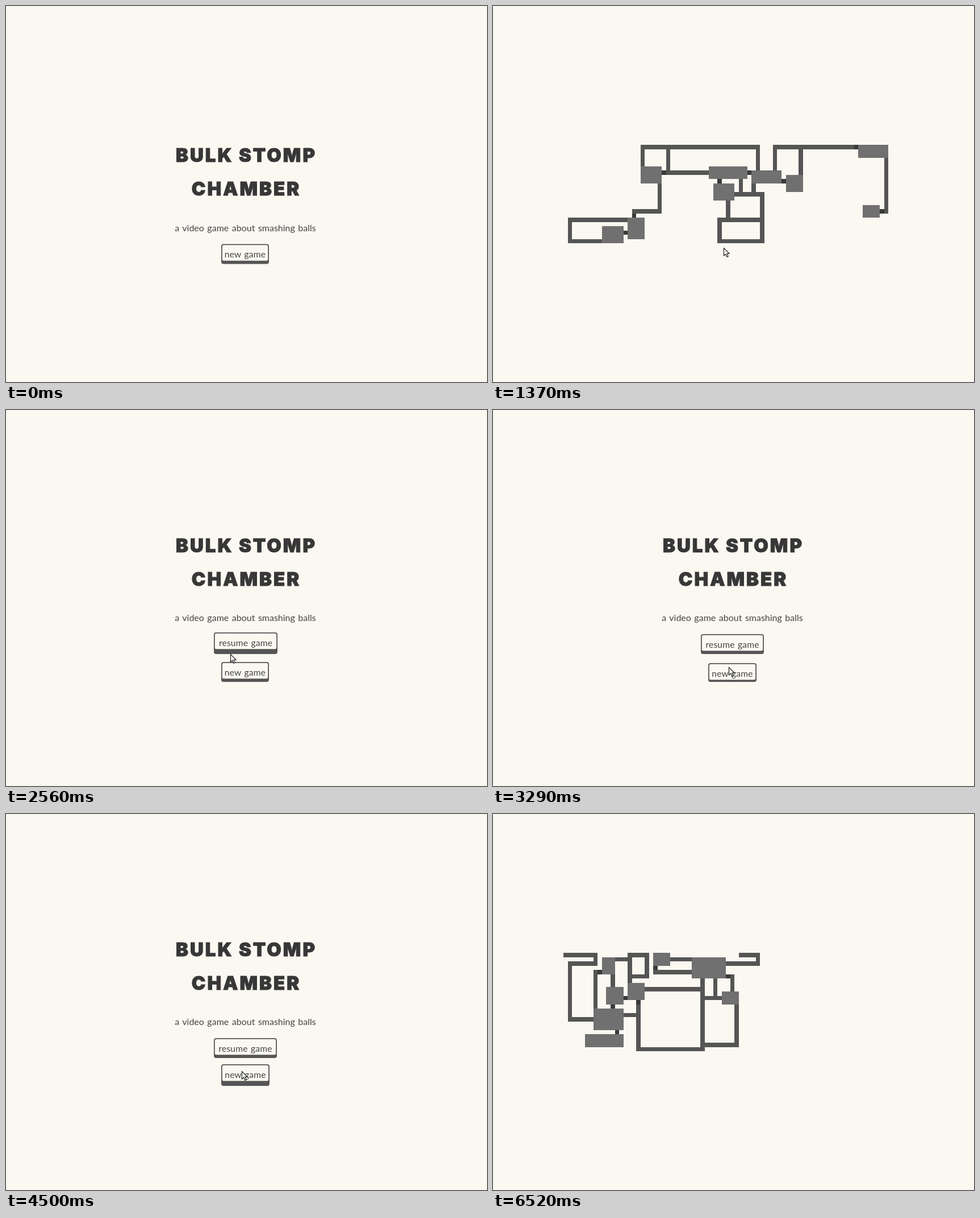
Write an HTML page that moves like this. It is 847 px wide and 661 px high and loops after 9.84 s.

```html
<!DOCTYPE html>
<html lang="en">
<head>
<meta charset="utf-8">
<title>Bulk Stomp Chamber</title>
<style>
  html, body { margin: 0; width: 100%; height: 100%; overflow: hidden; background: #fbf8f1; }
  svg { display: block; width: 100%; height: 100%; }
  text { text-anchor: middle; }
  .title { font: 900 33px Inter, sans-serif; letter-spacing: 3px; fill: #373737; stroke: #373737; stroke-width: 1; }
  .tag { font: 400 16px Lato, sans-serif; word-spacing: 1.4px; fill: #444; }
  .label { font: 400 15.6px Lato, sans-serif; letter-spacing: .2px; word-spacing: 1px; fill: #444; }
  .map { shape-rendering: crispEdges; }
  .hall { fill: none; stroke: #555; stroke-width: 1; stroke-linecap: square; }
  .room { fill: #707070; }
  .door { fill: #3a3a3a; }
</style>
</head>
<body>
<svg id="stage" viewBox="0 0 847 661"></svg>
<script>
const LOOP = 9840, PAPER = '#fbf8f1', INK = '#555';
const stage = document.getElementById('stage');

function add(parent, tag, attrs = {}, text = '') {
  const el = document.createElementNS('http://www.w3.org/2000/svg', tag);
  set(el, attrs);
  el.textContent = text;
  parent.appendChild(el);
  return el;
}
function set(el, attrs) {
  for (const key in attrs) el.setAttribute(key, attrs[key]);
}
const show = (el, on) => set(el, { display: on ? 'inline' : 'none' });

// Dungeon maps in grid cells: halls run through cell centres.
const dungeons = [
  {
    halls: 'M18 5V0H45V6M24 0V6M23 6H34M41 8V11M44 9V11M40 11H46V22H36V17H46M38 13V17' +
           'M49 6V0H69M55 0V7M75 3V15M22 9V15H16M14 17H1V22H9',
    rooms: ['18 5 5 4', '34 5 9 3', '44 6 7 3', '52 7 4 4', '35 9 5 4',
            '69 0 7 3', '70 14 4 3', '15 17 4 5', '9 19 5 4'],
    doors: ['23 6', '43 6', '36 8', '51 8', '68 0', '74 15', '16 16', '14 20']
  },
  {
    halls: 'M14 0H0V21H11M20 5V15M23 3H34V10M24 3V6M27 3V6M30 7H38V10M30 14H33' +
           'M30 17H37M37 15V22M37 18H40V15M25 19H29M18 22H24M13 11H18V6',
    rooms: ['15 0 8 5', '22 7 8 5', '8 10 5 5', '14 14 5 4', '12 19 6 4',
            '21 18 4 3', '27 13 3 5', '34 11 7 4', '32 20 4 3'],
    doors: ['23 3', '19 15', '28 12', '36 22', '29 18', '24 21', '14 18', '13 14']
  },
  {
    halls: 'M0 0H7V2H1V15H6M8 4H7V12M11 5V7M12 1H14M15 6V0H19V5H15M14 14H17M17 11V22H32V6' +
           'M19 8H32M25 1H29M21 4H29M38 2H45V0H41M39 8V5M35 6V10M33 10H36M40 12V21H33',
    rooms: ['9 1 3 4', '10 8 4 4', '15 7 4 4', '7 13 7 5', '5 19 9 3',
            '21 0 4 3', '30 1 8 5', '37 9 4 3'],
    doors: ['8 4', '11 12', '12 18', '14 10', '17 11', '21 3', '38 5']
  }
];

function makeMap({ halls, rooms, doors }) {
  const g = add(stage, 'g', { class: 'map', transform: 'translate(124.2 244.4) scale(7.525 7.51)' });
  add(g, 'path', { class: 'hall', d: halls, transform: 'translate(.5 .5)' });
  const cells = (list, kind) => list.forEach(item => {
    const [x, y, width = 1, height = 1] = item.split(' ');
    add(g, 'rect', { class: kind, x, y, width, height });
  });
  cells(doors, 'door');
  cells(rooms, 'room');
  return g;
}

const REST = 4, HOVER = 7, PRESSED = 2;

function makeButton(label, x, width, bottom) {
  const g = add(menu, 'g');
  const base = add(g, 'rect', { x, rx: 4, fill: INK });
  const face = add(g, 'rect', { x: x + 1.8, height: 27.4, rx: 2.5, fill: PAPER });
  const text = add(g, 'text', { class: 'label' }, label);
  return {
    g,
    hit: (px, py) => px >= x && px <= x + width && py >= bottom - 38 && py <= bottom,
    draw(lift) {
      const top = bottom - 31 - lift;
      const w = lift === REST ? width : width + 1;
      set(base, { y: top, width: w, height: 31 + lift });
      set(face, { y: top + 1.8, width: w - 3.6 });
      set(text, { x: x + w / 2, y: top + 23.5 });
    }
  };
}

const maps = dungeons.map(makeMap);
const menu = add(stage, 'g');
['BULK STOMP', 'CHAMBER'].forEach((s, i) =>
  add(menu, 'text', { class: 'title', x: 423, y: 249.7 + i * 59 }, s));
add(menu, 'text', { class: 'tag', x: 421.5, y: 371 }, 'a video game about smashing balls');
const resume = makeButton('resume game', 366, 111, 429);
const fresh = makeButton('new game', 379, 84, 478);
const pointer = add(stage, 'path', {
  d: 'M.5 .5V14L3.6 11.2L5.9 16.3L8.2 15.3L5.9 10.3H10.2Z',
  fill: '#fff', stroke: '#111', 'stroke-width': 1.1
});

// [start, map index or -1 for the menu]
const scenes = [[0, -1], [1260, 0], [2200, -1], [3740, 1], [4500, -1], [5530, 2]];
const presses = [[930, 1260], [3290, 3740], [4920, 5530]];
const track = [
  [210, 420, 552], [310, 422, 440], [400, 416, 395], [560, 414, 412], [720, 414, 430],
  [1260, 414, 430], [1600, 388, 416], [2040, 346, 398], [2390, 346, 398], [2560, 395, 429],
  [2720, 409, 447], [2910, 415, 452], [4900, 415, 452], [5020, 422, 458],
  [6400, 422, 458], [6470, 436, 615], [6520, 436, 615]
];

function pointerAt(t) {
  const i = track.findIndex(k => k[0] > t);
  if (i < 1) return null;
  const [t0, x0, y0] = track[i - 1], [t1, x1, y1] = track[i];
  const f = (t - t0) / (t1 - t0);
  return { x: Math.round(x0 + (x1 - x0) * f), y: Math.round(y0 + (y1 - y0) * f) };
}

function render(t) {
  const scene = scenes.filter(s => s[0] <= t).pop()[1];
  const pressed = presses.some(([a, b]) => t >= a && t < b);
  const p = pointerAt(t);
  const saved = t >= 2200;
  // Without the resume button the column is centred again.
  const top = saved ? 0 : 24.5, bottom = saved ? 0 : -24.5;
  const lift = button =>
    !p || !button.hit(p.x, p.y - bottom) ? REST : pressed ? PRESSED : HOVER;

  maps.forEach((m, i) => show(m, i === scene));
  show(menu, scene < 0);
  set(menu, { transform: `translate(0 ${top})` });
  set(fresh.g, { transform: `translate(0 ${bottom - top})` });
  show(resume.g, saved);
  resume.draw(lift(resume));
  fresh.draw(lift(fresh));

  show(pointer, p);
  if (p) set(pointer, { transform: `translate(${p.x} ${p.y})` });
}

const start = performance.now();
function tick() {
  render((performance.now() - start) % LOOP);
  requestAnimationFrame(tick);
}
tick();
</script>
</body>
</html>
```
